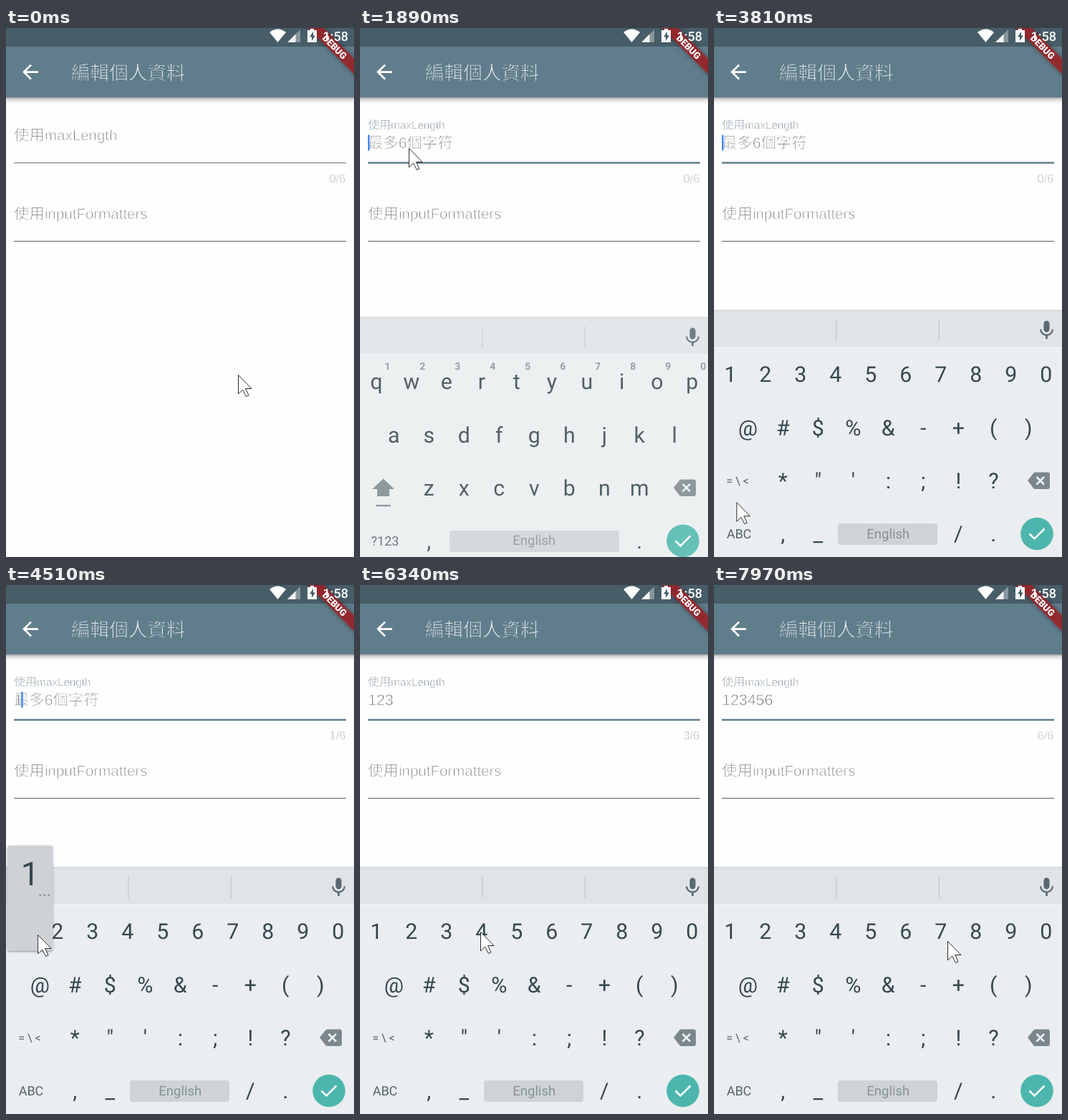
These frames come from a looping animation (486x740 px, 8 s). An HTML page:

```html
<!DOCTYPE html>
<html lang="zh-Hant">
<head>
<meta charset="utf-8">
<style>
html, body { margin: 0; width: 100%; height: 100%; overflow: hidden; background: #fefefe; }
svg { display: block; }
text { font-family: Roboto, sans-serif; text-rendering: geometricPrecision; }
/* A background-coloured stroke slims the glyphs */
.thin { font-family: "Liberation Sans", "Noto Sans CJK TC", "Noto Sans CJK", sans-serif; fill: #808080; stroke: #fefefe; stroke-width: .85; }
.typed { fill: #666; }
.title { fill: #e4eaed; stroke: #607d8b; }
.key { fill: #37474f; }
.dim { fill: #56636a; }
.pale { fill: #879298; }
.mid { text-anchor: middle; }
.end { text-anchor: end; }
</style>
</head>
<body>
<svg width="486" height="740" viewBox="0 0 486 740">
  <defs>
    <linearGradient id="fall" x2="0" y2="1">
      <stop offset="0" stop-opacity=".36"/>
      <stop offset=".4" stop-opacity=".12"/>
      <stop offset="1" stop-opacity="0"/>
    </linearGradient>
    <filter id="soft" x="-30%" y="-30%" width="160%" height="160%">
      <feDropShadow dx="0" dy="1" stdDeviation="1.5" flood-opacity=".5"/>
    </filter>
    <filter id="glow" x="-30%" y="-80%" width="160%" height="260%">
      <feDropShadow dx="0" dy="0" stdDeviation="3" flood-opacity=".5"/>
    </filter>
  </defs>
  <rect width="486" height="740" fill="#fefefe"/>
  <rect y="97" width="486" height="9" fill="url(#fall)"/>
  <rect width="486" height="97" fill="#607d8b"/>
  <rect width="486" height="26" fill="#475d68"/>
  <path transform="translate(17.7 45.2) scale(1.36)" fill="#fff" d="M20 11H7.83l5.59-5.59L12 4l-8 8 8 8 1.41-1.41L7.83 13H20z"/>
  <text class="thin title" x="91" y="72" font-size="26.6">編輯個人資料</text>

  <g transform="translate(459 26.5) rotate(45)">
    <rect x="-50" y="-7.7" width="100" height="15.4" fill="#9a262b" fill-opacity=".88" filter="url(#glow)"/>
    <text class="mid" y="4.6" font-size="13" font-weight="900" fill="#fff">DEBUG</text>
  </g>
  <g fill="#fff">
    <path d="M379.5 20 368 6Q379.5-3 391 6Z"/>
    <path d="M393 20 411 2V20Z" opacity=".35"/>
    <path d="M393 20 404.5 8.5V20Z" opacity=".9"/>
    <path d="M421 3h4V1h5v2h4V20H421Z"/>
    <path d="M429 5 424 12.5h3V18l5-7.5h-3Z" fill="#475d68"/>
    <text x="442.5" y="17.5" font-size="18" font-weight="500">1:58</text>
  </g>
  <g id="scene"></g>
</svg>
<script>
const LOOP = 8000, FOCUS = 1620, SYMBOLS = 3600;
const PRESSES = [4500, 4700, 5640, 6480, 6880, 7270];
// Pointer moves: from time, to time, new x, new y
const MOVES = [[700, 1340, 68, 168], [2540, 3250, 27, 722], [3670, 4230, 44, 489], [4510, 5210, 106, 507],
  [5780, 6340, 168, 485], [6610, 7540, 272, 505], [7700, 7970, 326, 498]];

const scene = document.getElementById('scene');
const clamp = v => Math.max(0, Math.min(1, v));
const ease = v => v * v * (3 - 2 * v);
const text = (x, y, size, str, cls, more = '') =>
  `<text x="${x}" y="${y}" font-size="${size}" class="${cls}" ${more}>${str}</text>`;
const rect = (x, y, w, h, fill, more = '') =>
  `<rect x="${x}" y="${y}" width="${w}" height="${h}" fill="${fill}" ${more}/>`;
const path = (d, fill, more = '') => `<path d="${d}" fill="${fill}" ${more}/>`;
const column = i => 22.8 + 49 * i;
const baseline = row => 495.2 + 74.4 * row;
const keys = (str, col, row) => [...str].map((c, i) =>
  text(column(col + i), baseline(row), 30.3, c.replace('&', '&amp;'), 'key mid')).join('');

function label(name, y, up) {
  const more = up ? `style="fill:rgb(${128 - 18 * up},128,${128 + 12 * up})"` : '';
  return `<g transform="translate(11 ${y - 16 * up}) scale(${1 - .255 * up})">` +
    text(0, 0, 21.4, '使用', 'thin', more) + text(43, 0, 20.5, name, 'thin', more) + '</g>';
}

function fields(t, count) {
  const up = ease(clamp((t - FOCUS) / 200));
  const hint = up * clamp((4620 - t) / 120);
  const since = t - (count ? PRESSES[count - 1] : FOCUS);
  const caretOn = since >= 0 && Math.floor(since / 500) % 2 === 0;
  return label('maxLength', 157, up) + label('inputFormatters', 267, 0) +
    rect(11, 188, 464, 1.2, '#808080') + rect(11, 297.8, 464, 1.2, '#707070') +
    rect(11, 187.4, 464, 2.4, '#607d8b', `opacity="${up}"`) +
    text(11, 168, 21.4, '最多6個字符', 'thin', `opacity="${hint}"`) +
    text(11, 168, 21.4, '123456'.slice(0, count), 'thin typed') +
    text(474.5, 215.5, 16.5, count + '/6', 'thin end') +
    (caretOn ? rect(count ? 9.3 + 12 * count : 11, 149.5, 2.4, 22, '#4285f4') : '');
}

function letters() {
  const small = [...'1234567890'].map((c, i) =>
    text(column(i) + 15.4, 468, 14, c, 'pale mid', 'font-weight="700"')).join('');
  return small + keys('qwertyuiop', 0, 0) + keys('asdfghjkl', .5, 1) + keys('zxcvbnm', 1.5, 2) +
    path('M32.5 620.5 48 635H41V645H24V635H17Z', '#7e898e') + rect(22, 657, 21, 2.4, '#7e898e') +
    text(35, 714, 18, '?123', 'dim mid') + keys(',', 1.5, 3) + keys('.', 7.5, 3) +
    rect(125, 693, 237, 30, '#ced3d6', 'rx="4"');
}

function symbols() {
  return keys('1234567890', 0, 0) + keys('@#$%&-+()', .5, 1) + keys(`*"':;!?`, 1.5, 2) +
    text(33, 639, 16, '= \\ &lt;', 'dim mid') + text(35, 714, 18, 'ABC', 'dim mid') +
    keys(',_', 1.5, 3) + keys('/.', 6.5, 3) + rect(173, 693, 139, 30, '#ced3d6', 'rx="4"');
}

function keyboard(t) {
  const k = clamp((t - 1650) / 360);
  if (!k) return '';
  return `<g transform="translate(0 ${30 * (1 - k)})" opacity="${clamp(k * 1.28)}">` +
    rect(0, 394, 486, 346, '#eaeef0') + rect(0, 394, 486, 53, '#e0e4e7') +
    rect(0, 394, 486, 2.5, '#d9dddf') + rect(0, 446.5, 486, 1.5, '#f3f6f7') +
    rect(170.3, 407, 1.2, 31, '#c3c8cb') + rect(313.8, 407, 1.2, 31, '#c3c8cb') +
    path('M12 14c1.66 0 3-1.34 3-3V5c0-1.66-1.34-3-3-3S9 3.34 9 5v6c0 1.66 1.34 3 3 3zm5.3-3c0 3-2.54 5.1-5.3 5.1S6.7 14 6.7 11H5c0 3.41 2.72 6.23 6 6.72V21h2v-3.28c3.28-.48 6-3.3 6-6.72z',
      '#5a6971', 'transform="translate(448.3 406.7) scale(1.35)"') +
    (t < SYMBOLS ? letters() : symbols()) +
    text(243.3, 713.5, 18.5, 'English', 'pale mid') +
    path('M438 633 446 623Q447 621.5 449 621.5H466Q469 621.5 469 624.5V642Q469 645 466 645H449Q447 645 446 643.5Z', '#7b878d') +
    path('M450.5 628 461 638.5M461 628 450.5 638.5', 'none', 'stroke="#eef1f2" stroke-width="2.6"') +
    '<circle cx="451" cy="707.5" r="22.8" fill="#4db6ac"/>' +
    path('M440.5 707.5 447.5 714.5 461.5 700.5', 'none', 'stroke="#fff" stroke-width="2.6"') + '</g>';
}

function popup(t, count) {
  if (!count || t - PRESSES[count - 1] > 265) return '';
  const x = Math.max(33.8, column(count - 1));
  return rect(x - 31.3, 364.5, 62.6, 147, '#ced2d5', 'rx="3" filter="url(#soft)"') +
    text(x, 419.5, 46, count, 'key mid') +
    [14, 20, 26].map(d => rect(x + d - 1.3, 432.7, 2.6, 2.6, '#8b969b')).join('');
}

function pointer(t) {
  let x = 324, y = 485;
  for (const [from, to, nx, ny] of MOVES) {
    const p = clamp((t - from) / (to - from));
    x += (nx - x) * p;
    y += (ny - y) * p;
  }
  return path('M0 0V26.5L6 20.5 11 30 14.5 28.3 10 19H18.5Z', '#fff',
    `stroke="#222" stroke-width=".95" transform="translate(${x + .5} ${y + .5})"`);
}

function frame() {
  const t = performance.now() % LOOP;
  const count = PRESSES.filter(v => v <= t).length;
  scene.innerHTML = fields(t, count) + keyboard(t) + popup(t, count) + pointer(t);
  requestAnimationFrame(frame);
}
frame();
</script>
</body>
</html>
```
